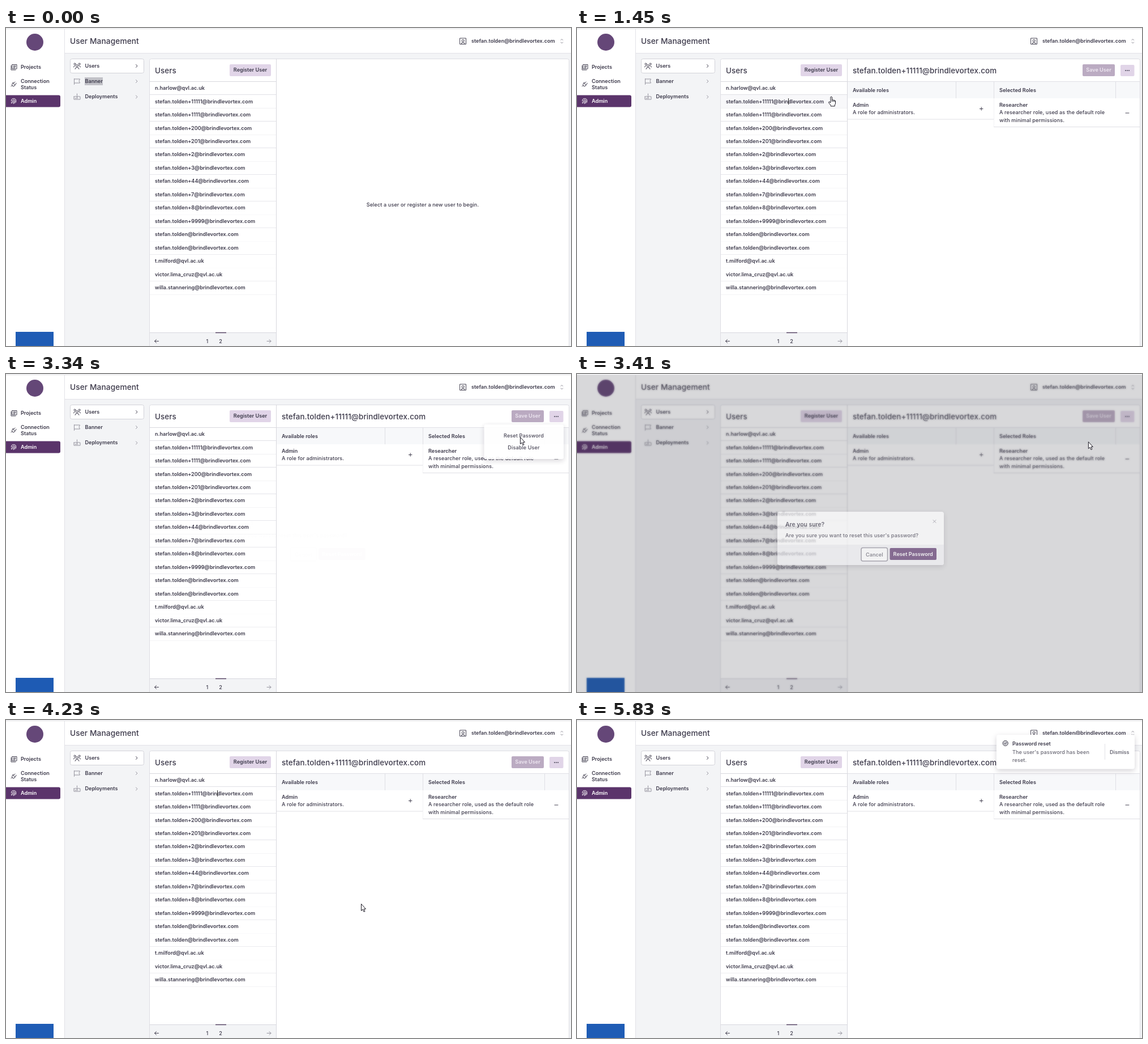
These frames come from a looping animation (998x561 px, 5.9 s). An HTML page:

```html
<!DOCTYPE html>
<html lang="en">
<head>
<meta charset="utf-8">
<title>User Management</title>
<style>
  html, body { margin: 0; width: 100%; height: 100%; overflow: hidden; background: #fff; }
  svg, #backdrop { position: absolute; left: 0; top: 0; }
  svg { width: 998px; height: 561px; }
  #backdrop { top: 2px; width: 998px; height: 559px; background: rgba(60, 60, 70, .3);
    backdrop-filter: blur(1.5px); }
  text { font: 500 9.1px Inter, "DejaVu Sans", sans-serif; letter-spacing: .1px; fill: #3d3a4b; }
  .bold { font-weight: 600; letter-spacing: 0; }
  .title { font-size: 13.4px; }
  .mid { text-anchor: middle; }
  .soft { fill: #696874; }
  .light { fill: #fff; }
  .icon { fill: none; stroke: #454252; stroke-width: 1; stroke-linecap: round; stroke-linejoin: round; }
  .pale { stroke: #96949f; }
  .float { filter: drop-shadow(0 3px 5px rgba(40, 30, 50, .2)); }
</style>
</head>
<body>
<svg viewBox="0 0 998 561">
  <rect width="998" height="561" fill="#fff"/>
  <path d="M0 1.5H998" stroke="#dedee2"/>

  <!-- sidebar -->
  <circle cx="51" cy="25" r="15" fill="#654778"/>
  <rect x="17" y="536" width="67" height="67" fill="#1f5cb5"/>
  <path d="M0 118.5H93q3 0 3 3V136.5q0 3-3 3H0Z" fill="#5b346b"/>
  <g class="icon">
    <path d="M11 64.5h8v7.5h-8ZM9 66.5v7.5h8M13 66.7h4M13 68.5h4M13 70.3h2.5"/>
    <path d="M9 103l2-2M12 97l4 4q-2 3-4.5 1.5Q9 100 12 97M13.5 96l-1.5 1M17 99.5l-1.5 1.5M14 97.5l2-2.5M16 99.5l2.5-2"/>
    <path stroke="#fff" style="stroke:#fff" d="M9.5 129Q9 124.5 13.5 124.5T17.5 129V131M11 132.5Q11.5 126.5 13.5 126.5T15.5 129V132.5M13.5 129V133.5M9.5 131.5v1"/>
  </g>
  <text class="bold" x="26" y="72">Projects</text>
  <text class="bold" x="26" y="97">Connection</text>
  <text class="bold" x="26" y="108">Status</text>
  <text class="bold light" x="26" y="132">Admin</text>

  <!-- header and section menu -->
  <path d="M104 44.5H998V561H104Z" fill="#f3f4f6"/>
  <path d="M103.5 2V561M104 44.5H998" stroke="#e2e2e7" fill="none"/>
  <text class="title" x="113" y="28" style="font-size:13.7px">User Management</text>
  <g class="icon">
    <path d="M802 18h10.5v10.5H802ZM804.5 28v-1.5q2.7-2 5.5 0V28"/>
    <circle cx="807.2" cy="22.5" r="2"/>
    <path class="pale" d="M980 21.5l1.8-2 1.8 2M980 25l1.8 2 1.8-2"/>
  </g>
  <text class="bold" id="account" x="822" y="26"></text>

  <rect x="113.5" y="54.5" width="130" height="25" rx="3" fill="#fff" stroke="#d2d2d9"/>
  <rect id="selection" x="139" y="87" width="32" height="14" fill="#c2c2c8"/>
  <text class="bold" x="139.5" y="69.5">Users</text>
  <text class="bold" x="139.5" y="97">Banner</text>
  <text class="bold" x="139.5" y="124">Deployments</text>
  <g class="icon">
    <circle cx="125.5" cy="66.5" r="1.9"/><circle cx="121.5" cy="63.5" r="1.5"/><circle cx="129.5" cy="63.5" r="1.5"/>
    <path d="M122 72.5q0-3 3.5-3t3.5 3M119.5 69q0-2.5 2.5-2.5M131.5 69q0-2.5-2.5-2.5M229.5 64.5l2.5 2.5-2.5 2.5"/>
    <path class="pale" d="M120.5 89.5v10M120.5 90h10l-1.5 3.5 1.5 3.5h-10M229.5 91.5l2.5 2.5-2.5 2.5M120 121v5h11v-5h-2.5M122.5 121H120M125.5 116v6M123 120l2.5 2.5 2.5-2.5M122 124h5M229.5 119l2.5 2.5-2.5 2.5"/>
  </g>

  <!-- user list -->
  <path d="M253.5 561V57.5q0-3 3-3H991.5q3 0 3 3V561" fill="#fff" stroke="#dddde3"/>
  <rect x="254" y="537" width="223" height="24" fill="#f3f4f6"/>
  <g id="rows"></g>
  <path d="M477.5 54V561M254 94.5H477M254 537.5H477" stroke="#d8d8de" fill="none"/>
  <path d="M370 537.5H389" stroke="#4d3a5c" stroke-width="1.4"/>
  <text class="title" x="263" y="79.5">Users</text>
  <rect x="395" y="64" width="73" height="21" rx="2" fill="#e1d5e8"/>
  <text class="bold mid" x="431.5" y="77">Register User</text>
  <text class="mid" x="355.5" y="556">1</text>
  <text class="mid" x="379" y="556">2</text>
  <path class="icon" d="M269.5 552.5h-7M265.5 549.5l-3 3 3 3"/>
  <path class="icon pale" d="M461 552.5h7M465 549.5l3 3-3 3"/>
  <path id="caret" d="M373.5 124V135" stroke="#222"/>

  <text class="mid" id="hint" x="736" y="314.5">Select a user or register a new user to begin.</text>

  <!-- user details -->
  <g id="details">
    <path d="M478 95H994V124H478Z" fill="#f7f8fa"/>
    <path d="M736.5 124V174" stroke="#f1f1f4"/>
    <path d="M478 94.5H994M669.5 95V124M736.5 95V124M951.5 95V124M478 161H736M736 174.5H994" stroke="#dfdfe5" fill="none"/>
    <text class="title" id="heading" x="487" y="79.5"></text>
    <rect x="893" y="64" width="57" height="21" rx="2" fill="#bbabc2"/>
    <text class="bold mid" x="921.5" y="77" style="fill:#eee7f1">Save User</text>
    <rect id="more" x="960" y="65" width="24.5" height="20" rx="2" fill="#e1d5e8"/>
    <g fill="#3d3a4b">
      <circle cx="969" cy="75" r=".9"/><circle cx="972" cy="75" r=".9"/><circle cx="975" cy="75" r=".9"/>
    </g>
    <text class="bold" x="487" y="113">Available roles</text>
    <text class="bold" x="746" y="113">Selected Roles</text>
    <text class="bold" x="487" y="139">Admin</text>
    <text x="487" y="152">A role for administrators.</text>
    <text class="bold" x="746" y="139">Researcher</text>
    <text x="746" y="152">A researcher role, used as the default role</text>
    <text x="746" y="165.5">with minimal permissions.</text>
    <path class="icon" d="M711.5 142.5h5.5M714.2 139.7v5.5M969 150h6"/>
  </g>

  <g id="menu">
    <rect class="float" x="844.5" y="89" width="140.5" height="61" rx="3" fill="#fff"/>
    <text class="mid" x="914.5" y="111.5">Reset Password</text>
    <text class="mid" x="914.5" y="132.5">Disable User</text>
  </g>

  <g id="toast">
    <rect class="float" x="741" y="26" width="244" height="60.5" rx="4" fill="#fff"/>
    <circle cx="756.7" cy="41" r="4.7" fill="#c9c9ce" stroke="#55535f"/>
    <path class="icon" d="M754.5 41l1.6 1.6 2.9-3.2"/>
    <text class="bold" x="769" y="45">Password reset</text>
    <text class="soft" x="769" y="60">The user's password has been</text>
    <text class="soft" x="769" y="73.5">reset.</text>
    <path d="M932.5 42V70" stroke="#e2e2e7"/>
    <text class="bold soft" x="941" y="59.5">Dismiss</text>
  </g>
</svg>

<div id="backdrop"></div>

<svg viewBox="0 0 998 561">
  <g id="dialog">
    <rect class="float" x="354" y="243" width="294" height="94" rx="4" fill="#fff"/>
    <path d="M354 301H648V333q0 4-4 4H358q-4 0-4-4Z" fill="#f2f2f5"/>
    <text class="bold" x="368" y="268.5" style="font-size:10.4px">Are you sure?</text>
    <text x="368" y="287.5">Are you sure you want to reset this user's password?</text>
    <path class="icon pale" d="M629 257.5l5 5M634 257.5l-5 5"/>
    <rect x="502" y="306.5" width="46.5" height="23.5" rx="3" fill="#fff" stroke="#8e8b98" stroke-width="1.6"/>
    <text class="mid bold soft" x="525.3" y="321.5">Cancel</text>
    <rect x="552.5" y="307" width="82.5" height="21" rx="2" fill="#5b346b"/>
    <text class="mid bold light" x="593.7" y="321">Reset Password</text>
  </g>
  <g id="cursor" fill="#fff" stroke="#1c1a24" stroke-linejoin="round">
    <path id="arrow" d="M.5.5V12.5L3.2 10 5 14.3 7 13.5 5.2 9.3H8.5Z"/>
    <path id="hand" d="M-1.3 1.5Q0-.5 1.3 1.5V6.5Q2.5 5.5 3.5 7 4.8 6 5.7 7.5 7 7 7.3 8.5V12.5Q7 14.5 6 15.5V17.5H-1V16L-4.5 11.5Q-5 9.5-3.2 9.7L-1.3 11.5ZM1.3 6.5V9.5M3.5 7V9.7M5.7 7.5V9.9"/>
  </g>
</svg>

<script>
const LOOP = 5900, ROW_TOP = 94.5, ROW_HEIGHT = 23.47;
const el = id => document.getElementById(id);
const address = (tag = '') => `stefan.tolden${tag}@brindlevortex.com`;
const users = ['n.harlow@qvl.ac.uk',
  ...['+11111', '+1111', '+200', '+201', '+2', '+3', '+44', '+7', '+8', '+9999', '', ''].map(address),
  't.milford@qvl.ac.uk', 'victor.lima_cruz@qvl.ac.uk', 'willa.stannering@brindlevortex.com'];

el('account').textContent = address();
el('heading').textContent = address('+11111');
el('rows').innerHTML = users.map((name, i) => {
  const y = ROW_TOP + i * ROW_HEIGHT, bottom = Math.round(y + ROW_HEIGHT - .5) + .5;
  return `<rect x="254" y="${y}" width="223" height="${ROW_HEIGHT}" fill="#fff"/>
    <path d="M254 ${bottom}H477" stroke="${i < users.length - 1 ? '#dfdfe5' : '#f3f3f6'}"/>
    <text class="bold" x="263" y="${y + 14.6}">${name}</text>`;
}).join('');
const rowFills = [...el('rows').querySelectorAll('rect')];

// Pointer positions: time, x, y
const path = [
  [130, 884, 535], [760, 380, 150], [1000, 373, 127], [1240, 373, 127],
  [2180, 966, 76], [2250, 966, 76], [2580, 894, 142], [2870, 909, 111], [3270, 909, 111],
  [3340, 908, 111], [3410, 903, 119], [3780, 594, 314], [3960, 594, 314],
  [4230, 627, 324], [4380, 627, 324], [5020, 961, 98], [5630, 880, 564]];

const ramp = (t, from, to) => Math.min(1, Math.max(0, (t - from) / (to - from)));
const easeOut = p => 1 - (1 - p) ** 2;
const within = (t, from, to) => t >= from && t < to;
const show = (id, alpha) => {
  el(id).style.opacity = +alpha;
  el(id).style.visibility = alpha ? 'visible' : 'hidden';
};

const rate = (i, axis) => (path[i + 1][axis] - path[i][axis]) / (path[i + 1][0] - path[i][0]);

// Harmonic mean of the neighbouring rates: smooth motion that never overshoots
function speed(i, axis) {
  if (i === 0) return rate(0, axis);
  if (i === path.length - 1) return rate(i - 1, axis);
  const before = rate(i - 1, axis), after = rate(i, axis);
  return before * after > 0 ? 2 * before * after / (before + after) : 0;
}

function pointerAt(t) {
  const next = path.findIndex(point => point[0] > t), i = next - 1;
  if (i < 0) return null;
  const span = path[next][0] - path[i][0], p = (t - path[i][0]) / span, q = 1 - p;
  return [1, 2].map(axis =>
    q * q * (1 + 2 * p) * path[i][axis] + p * p * (1 + 2 * q) * path[next][axis]
    + span * p * q * (q * speed(i, axis) - p * speed(next, axis)));
}

function render(t) {
  show('selection', t < 1040);
  show('hint', t < 1380);
  show('details', t >= 1380);
  show('caret', within(t, 1040, 1570) || within(t, 4230, 4760) || within(t, 5290, 5820));
  show('menu', ramp(t, 2300, 2400) * (1 - ramp(t, 3336, 3400)));
  show('toast', easeOut(ramp(t, 4430, 4630)));
  const modal = easeOut(ramp(t, 3340, 3510)) * (1 - easeOut(ramp(t, 4000, 4200)));
  show('backdrop', modal);
  show('dialog', modal);

  const pointer = pointerAt(t), [x, y] = pointer || [-99, -99];
  const over = (left, top, right, bottom) => x > left && x < right && y > top && y < bottom;
  const hovered = !modal && over(254, ROW_TOP, 477, 470) ? Math.floor((y - ROW_TOP) / ROW_HEIGHT) : -1;
  const overMore = t >= 1380 && over(960, 65, 985, 85);
  const overConfirm = modal > 0 && over(552, 307, 635, 328);
  const clickable = hovered >= 0 || overMore || overConfirm;
  rowFills.forEach((row, i) => row.setAttribute('fill', i === hovered ? '#f8f8fa' : '#fff'));
  el('more').setAttribute('fill', overMore ? '#d9c8e2' : '#e1d5e8');
  show('hand', pointer && clickable);
  show('arrow', pointer && !clickable);
  el('cursor').setAttribute('transform', `translate(${x} ${y})`);
}

function tick() {
  render(performance.now() % LOOP);
  requestAnimationFrame(tick);
}
tick();
</script>
</body>
</html>
```
